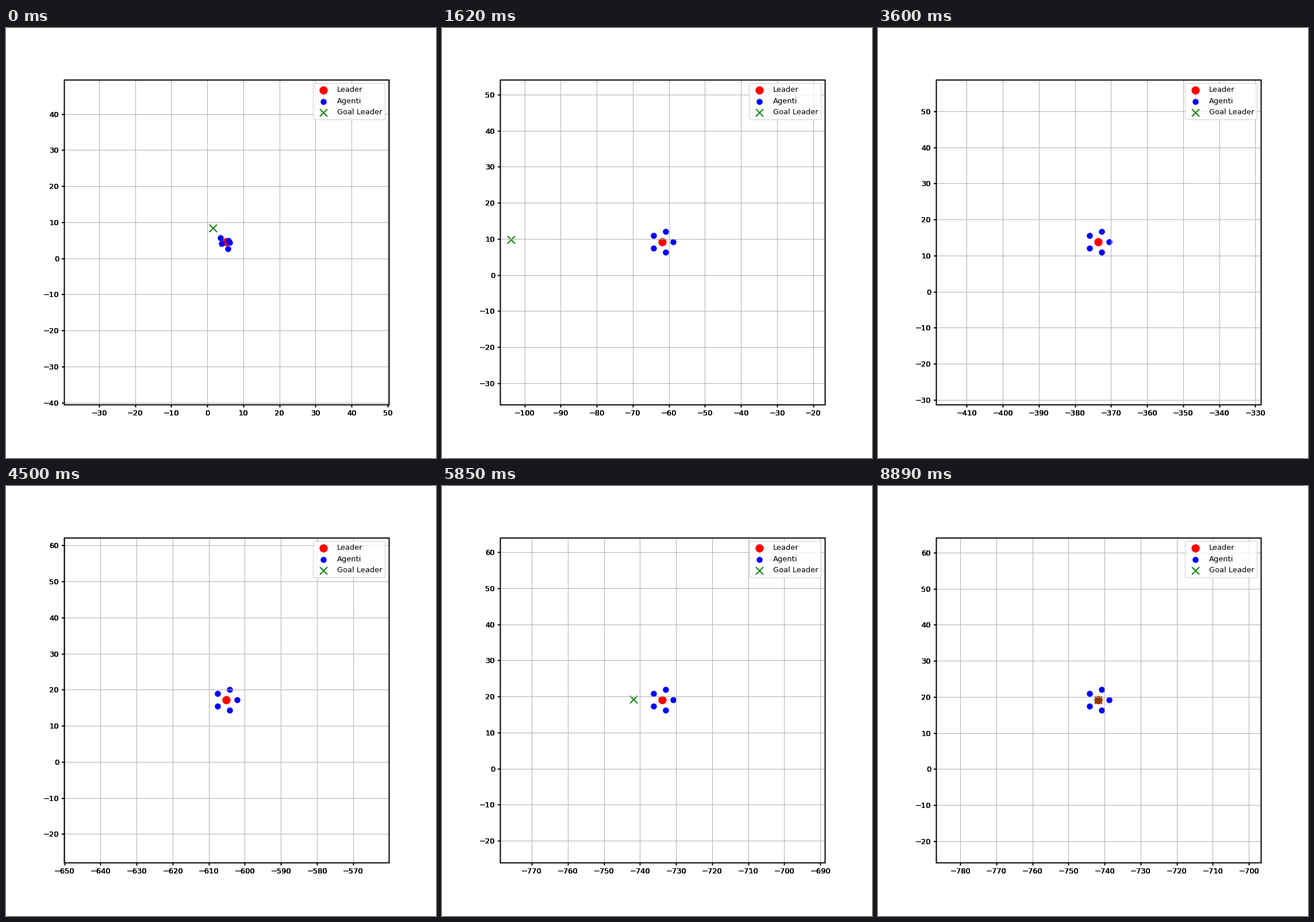
Recreate the animation shown at these times as a matplotlib script. Size 748 by 748 pixels, loop 9050 ms.

```python
import numpy as np
import matplotlib.pyplot as plt
from matplotlib.animation import FuncAnimation
from matplotlib.text import Text

SIZE, DPI = 748, 93.5
LOOP_MS, FRAMES = 9050, 302
PX = 72 / DPI                                   # one pixel in points
LEFT, RIGHT = 0.135 * SIZE, 0.89 * SIZE
TOP, BOTTOM = 0.12 * SIZE, 0.875 * SIZE
CENTER = np.array([LEFT + RIGHT, TOP + BOTTOM]) / 2   # the view follows the leader
HALF_VIEW = 45                                  # units
SCALE = (RIGHT - LEFT) / (2 * HALF_VIEW)        # pixels per unit
TICK, LABEL_GAP = 3.5 / PX, 7 / PX
OVERPRINT = 5                                   # passes that darken the tick labels

# The goal accelerates along a line, then stops; the leader chases it.
GOAL_START = np.array([1.55, 8.35])
LEADER_START = np.array([5.29, 4.55])
HEADING = np.array([-1, 0.01453])
SPEED, ACCEL, GAIN, STOP = 0.26, 0.031302, 0.06315, 150

# The agents settle on a ring around the leader.
ANGLES = 2 * np.pi * np.arange(5) / 5
RING = 3 * np.column_stack([np.cos(ANGLES), np.sin(ANGLES)])
SCATTER = np.array([[0.88, -0.16], [0.53, 0.32], [-1.64, 1.15],
                    [-1.27, -0.48], [0.40, -1.83]])
SETTLE = 0.1


class TickLabel(Text):
    def draw(self, renderer):
        for _ in range(OVERPRINT):
            super().draw(renderer)


def snap(value):
    """Center of the pixel that a thin line falls on."""
    return np.floor(value + 0.5) + 0.5


plt.rcParams["font.family"] = "DejaVu Sans"
fig = plt.figure(figsize=(SIZE / DPI, SIZE / DPI), dpi=DPI, facecolor="white")
ax = fig.add_axes([0, 0, 1, 1])
ax.set(xlim=(0, SIZE), ylim=(SIZE, 0))
ax.axis("off")

leader = ax.scatter([0], [0], s=100, c="red", label="Leader")
agents = ax.scatter([0] * 5, [0] * 5, s=50, c="blue", label="Agenti")
goal = ax.scatter([0], [0], s=100, c="green", marker="x", label="Goal Leader")
ax.legend(loc="upper right", fontsize=10, borderaxespad=0.5,
          bbox_to_anchor=(RIGHT / SIZE, 1 - TOP / SIZE))

x0, x1, y0, y1 = snap(np.array([LEFT, RIGHT, TOP, BOTTOM]))
border = ax.add_patch(plt.Rectangle((x0, y0), x1 - x0, y1 - y0, fill=False,
                                    ec="black", lw=2 * PX, zorder=2.5, snap=False))
goal.set_clip_path(border)


def line_set(color, width, zorder):
    line, = ax.plot([], [], color=color, lw=width, zorder=zorder,
                    solid_capstyle="butt")
    line.set_snap(False)
    return line


def label_pool(ha, va):
    return [ax.add_artist(TickLabel(0, 0, "", fontsize=10, ha=ha, va=va, zorder=3))
            for _ in range(10)]


grid = line_set("#b0b0b0", PX, 1.5)
ticks = line_set("black", 2 * PX, 2.4)
x_labels = label_pool("center", "top")
y_labels = label_pool("right", "center_baseline")


def lag(n):
    return (SPEED + ACCEL * (2 * n - 1)) / GAIN - 2 * ACCEL / GAIN ** 2


def positions(n):
    m = min(n, STOP)
    goal_pos = GOAL_START + HEADING * (SPEED * m + ACCEL * m * m)
    start_gap = GOAL_START - LEADER_START
    gap = HEADING * lag(m) + (start_gap - HEADING * lag(0)) * np.exp(-GAIN * m)
    return goal_pos, goal_pos - gap * np.exp(-GAIN * (n - m))


def to_pixels(points, view):
    return CENTER + (points - view) * [SCALE, -SCALE]


def visible_ticks(middle):
    first = int(np.ceil((middle - HALF_VIEW) / 10))
    last = int(np.floor((middle + HALF_VIEW) / 10))
    return 10 * np.arange(first, last + 1)


def set_segments(line, segments):
    gap = (np.nan, np.nan)
    line.set_data(*zip(*[p for a, b in segments for p in (a, b, gap)]))


def set_labels(pool, values, places):
    for i, text in enumerate(pool):
        shown = i < len(values)
        text.set_visible(shown)
        if shown:
            text.set_position(places[i])
            text.set_text(str(values[i]).replace("-", "\u2212"))


def update(n):
    goal_pos, view = positions(n)
    offsets = RING + (SCATTER - RING) * np.exp(-SETTLE * n)
    leader.set_offsets([CENTER])
    agents.set_offsets(to_pixels(view + offsets, view))
    goal.set_offsets([to_pixels(goal_pos, view)])

    x_values, y_values = visible_ticks(view[0]), visible_ticks(view[1])
    xs = CENTER[0] + (x_values - view[0]) * SCALE
    ys = CENTER[1] - (y_values - view[1]) * SCALE
    set_segments(grid, [((x, y0), (x, y1)) for x in snap(xs)]
                 + [((x0, y), (x1, y)) for y in snap(ys)])
    set_segments(ticks, [((x, y1), (x, y1 + TICK)) for x in snap(xs)]
                 + [((x0 - TICK, y), (x0, y)) for y in snap(ys)])
    set_labels(x_labels, x_values, [(x, BOTTOM + LABEL_GAP) for x in xs])
    set_labels(y_labels, y_values, [(LEFT - LABEL_GAP, y) for y in ys])
    return []


anim = FuncAnimation(fig, update, frames=FRAMES, interval=LOOP_MS / FRAMES,
                     init_func=lambda: update(0), repeat=True, repeat_delay=0)
plt.show()
```
